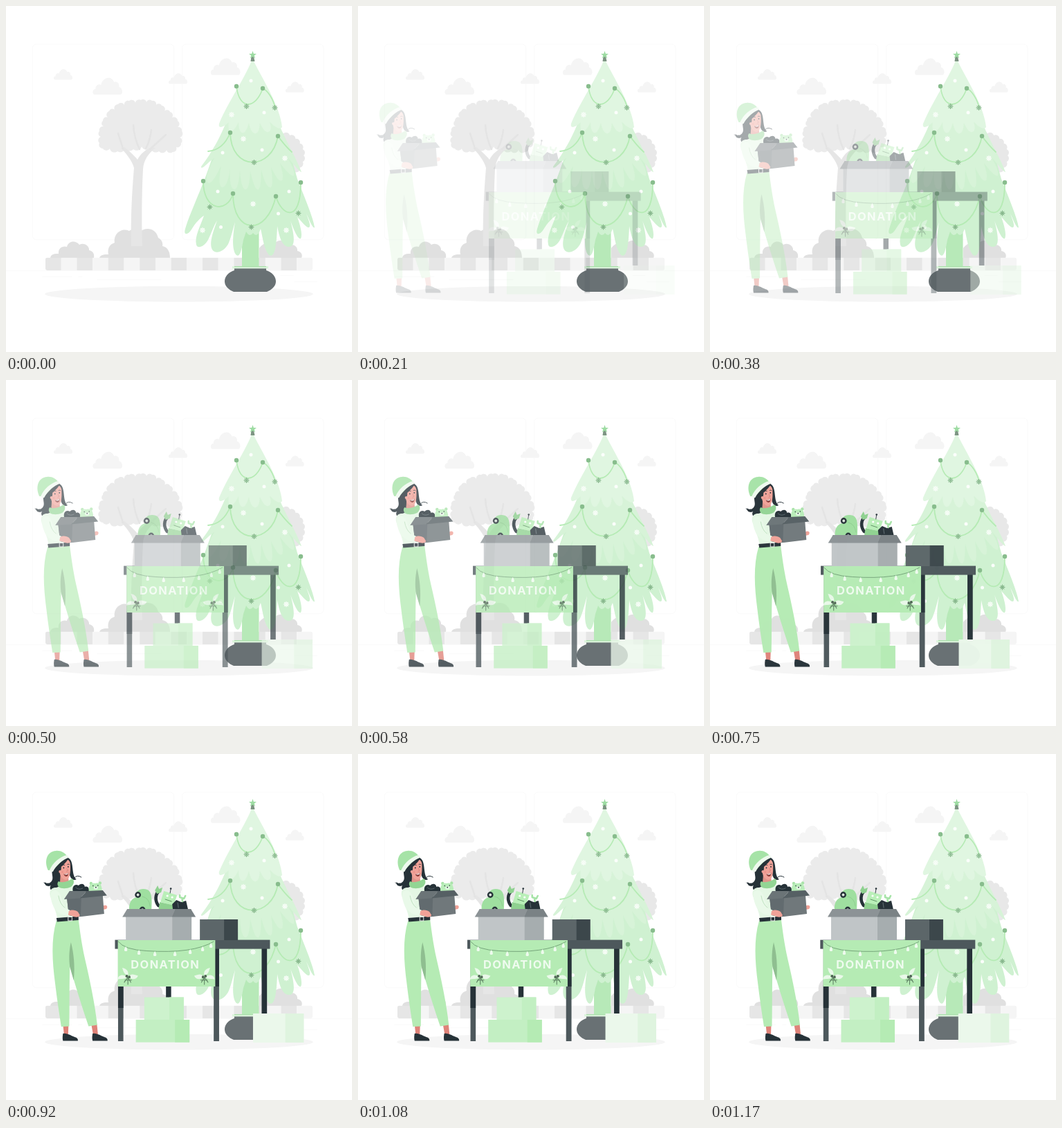
An HTML page for the animation above (1210 ms loop, 500 by 500 pixels).

```html
<!DOCTYPE html>
<html lang="en">
<head>
<meta charset="utf-8">
<title>Donation table</title>
<style>
html, body { margin: 0; width: 100%; height: 100%; overflow: hidden; background: #fff; }
svg { display: block; width: 100%; height: 100%; }
</style>
</head>
<body>
<svg viewBox="0 0 500 500">
  <g id="back"></g>
  <g id="pine"></g>
  <g id="table" opacity="0"></g>
  <g id="girl" opacity="0"></g>
</svg>
<script>
const $ = id => document.getElementById(id);
const path = (d, fill) => `<path d="${d}" fill="${fill}"/>`;
const line = (d, color, w = 1) =>
  `<path d="${d}" fill="none" stroke="${color}" stroke-width="${w}" stroke-linecap="round" stroke-linejoin="round"/>`;
const rect = (x, y, w, h, fill) => `<rect x="${x}" y="${y}" width="${w}" height="${h}" fill="${fill}"/>`;
const dot = (x, y, r, fill) => `<circle cx="${x}" cy="${y}" r="${r}" fill="${fill}"/>`;
const ring = (x, y, r, color, w) => `<circle cx="${x}" cy="${y}" r="${r}" fill="none" stroke="${color}" stroke-width="${w}"/>`;

const GREEN = '#b5ebb4', INK = '#263238', STEEL = '#4d585c', SKIN = '#f0a298', PALE = '#e4f7e4';

// Closed outline made of small round bumps
function scallop(pts, fill, bulge = 0.58) {
  let d = `M${pts[0]}`;
  pts.forEach((p, i) => {
    const q = pts[(i + 1) % pts.length];
    const r = Math.hypot(q[0] - p[0], q[1] - p[1]) * bulge;
    d += `A${r} ${r} 0 0 1 ${q}`;
  });
  return path(d + 'Z', fill);
}

function oval(cx, cy, rx, ry, n) {
  return Array.from({ length: n }, (_, i) => {
    const a = i / n * 2 * Math.PI;
    return [cx + rx * Math.cos(a), cy + ry * Math.sin(a)];
  });
}

function flake(x, y, r, color, w) {
  let d = '';
  for (let i = 0; i < 4; i++) {
    const a = i * Math.PI / 4, dx = r * Math.cos(a), dy = r * Math.sin(a);
    d += `M${x - dx} ${y - dy}L${x + dx} ${y + dy}`;
  }
  return line(d, color, w) + ring(x, y, r * 0.72, color, w * 0.8);
}

function cloud(x, y, s) {
  return `<g transform="translate(${x} ${y}) scale(${s})">` + path(
    'M3 25C-1 25-1 17 4 17C4 11 9 9 12 11C14 1 26-4 31 7C36 5 39 10 38 14C44 15 44 25 40 25Z', '#f5f5f5') + '</g>';
}

function drawBack() {
  let s = '';
  for (const x of [38.3, 254.6])
    s += `<rect x="${x}" y="55.1" width="204.3" height="282.6" rx="5.6" fill="none" stroke="#ebebeb" stroke-width=".25"/>`;
  s += rect(0, 382.4, 500, 0.25, '#ebebeb');
  for (const [x, y, w] of [[416.8, 398.5, 33], [396.6, 389.2, 19], [52.5, 390.9, 43], [104.6, 390.9, 6], [131.5, 395.1, 93]])
    s += rect(x, y, w, 0.25, '#ebebeb');
  s += cloud(69, 90.8, 0.63) + cloud(125.3, 103, 1) + cloud(235, 96.8, 0.63) +
       cloud(295.8, 74.8, 1) + cloud(403.8, 109, 0.63);
  s += scallop(oval(396, 216, 34, 32, 22), '#e8e8e8');
  s += scallop([[140, 206], [135, 198], [137, 189], [135, 181], [141, 174], [140, 166], [147, 161], [149, 152],
    [157, 150], [162, 142], [171, 143], [178, 137], [187, 140], [195, 136], [203, 139], [211, 137], [217, 143],
    [225, 144], [229, 152], [237, 153], [240, 161], [248, 166], [248, 175], [254, 181], [251, 190], [253, 198],
    [246, 204], [241, 211], [232, 208], [221, 210], [209, 205], [196, 203], [184, 207], [172, 205], [161, 210], [150, 206]], '#ebebeb');
  // bushes
  s += path('M64 364C65 358 71 358 76 358C75 350 82 346 88 348C90 339 101 338 106 345C113 341 121 347 120 353C126 354 128 359 127 364Z', '#e0e0e0');
  s += path('M135 364C137 359 142 359 148 359C146 349 151 344 157 342C155 329 167 320 178 325C184 321 191 322 195 325C204 319 217 322 220 335C226 338 227 344 226 347C234 348 237 356 237 364Z', '#e0e0e0');
  s += path('M366 364V350C372 342 381 339 389 342C396 336 407 339 409 346C415 343 422 348 421 354C427 355 429 360 427 364Z', '#e0e0e0');
  // trunk
  s += path('M181 347C180 305 182 270 185 234C182 222 172 212 166 205L171 204C180 211 186 217 190 222C194 214 202 207 210 204L216 205C206 213 199 222 198 236C196 275 196 315 197 347Z', '#e6e6e6');
  s += line('M169 206L162 184M184 172Q185 190 193 207M208 207L231 186M202 206Q208 195 210 179', '#e4e4e4', 2.5);
  // planter bricks
  s += '<clipPath id="wall"><rect x="57" y="363.6" width="386" height="18.4" rx="3"/></clipPath><g clip-path="url(#wall)">';
  for (let i = 0; i < 17; i++)
    s += rect(57 + i * 22.7, 363.6, 22.8, 18.4, (i % 2 === 0) === (i < 13) ? '#e6e6e6' : '#f5f5f5');
  s += '</g><ellipse cx="250" cy="416.2" rx="193.9" ry="11.3" fill="#f5f5f5"/>';
  return s;
}

function drawPine() {
  let s = rect(341, 312, 24.5, 65, '#b7e9b8');
  s += path('M302 205C292 245 267 295 259 322C256 332 263 331 268 323C274 313 281 306 286 303C281 318 272 333 275 345C277 352 287 347 292 338C297 328 300 318 305 310C300 325 293 342 298 352C303 360 317 354 322 342C326 332 328 322 331 312C328 330 326 350 332 359C338 366 341 350 343 338L347 326Q352 335 357 328Q363 336 368 322C371 335 373 352 380 360C389 365 391 345 392 318C395 334 399 347 408 348C419 349 417 333 411 310C415 322 422 338 426 336C429 331 425 316 421 305C427 311 434 321 438 320C441 317 437 309 434 300C438 308 443 322 446 320C444 306 432 278 421 250L407 200Z', '#cff1d1');
  s += path('M324 150C316 180 297 213 282 232C282 239 293 224 301 220C293 234 286 252 293 256C300 255 307 238 311 231C308 246 307 262 313 262C320 260 322 246 324 236C323 250 324 266 331 265C336 262 337 248 338 238C339 251 341 266 347 265C352 262 352 249 353 239C356 251 360 267 365 265C369 261 368 247 369 237C372 249 377 264 383 262C387 257 384 243 383 233C388 243 394 255 399 252C402 246 398 235 396 227C402 235 412 247 416 245C418 238 411 227 407 219C413 225 424 240 427 240C420 220 401 190 388 155Z', '#d7f3d8');
  s += path('M356 76C348 100 320 140 308 170C306 179 316 174 322 168C320 178 323 184 328 180C332 176 334 172 336 168C336 180 340 186 345 182C349 177 350 172 351 169C353 180 358 187 363 183C367 178 366 173 367 169C371 178 376 185 381 181C384 177 382 171 381 167C387 174 396 180 399 175C396 145 372 108 356 76Z', '#e0f6e1');
  // garlands
  s += line('M333 116C337 151 361 149 371 119C378 122 386 134 389 147', GREEN, 1.6);
  s += line('M292 210Q314 208 324 183C325 239 384 239 393 188Q403 202 413 211', GREEN, 1.8);
  s += line('M285 253C285 297 320 300 328 271C328 331 377 333 390 275C398 303 426 316 426 255', GREEN, 1.8);
  for (const [x, y] of [[333, 116], [371, 119], [324, 183], [393, 188], [285, 253], [328, 271], [390, 275], [426, 255]])
    s += dot(x, y, 3.2, '#88bd8d');
  for (const [x, y] of [[347.5, 145], [388.5, 147], [358.5, 226], [294.5, 290.5], [354.5, 319.5], [422.5, 299.5]])
    s += flake(x, y, 3.6, '#83b488', 0.9);
  for (const [x, y] of [[354, 108], [373, 154], [313, 212], [370, 208], [306, 268], [409, 268], [310.5, 319.5], [393.5, 300]])
    s += dot(x, y, 2.5, '#fbfefb');
  for (const [x, y] of [[326, 157], [343, 192], [403, 220], [357, 286], [284, 324], [405, 324]])
    s += flake(x, y, 3.8, '#f7fdf7', 1.1);
  // star and pot
  s += path('M354.5 73H358L359.5 80H353.5Z', '#7d9583');
  s += path('M356.5 65L357.9 69L362 69L358.8 71.6L360 75.5L356.5 73.2L353 75.5L354.2 71.6L351 69L355.1 69Z', '#9edca3');
  s += path('M330 379H376V382C385 385 390 391 390 398C390 405 384 410 377 413H329C322 410 316 405 316 398C316 391 321 385 330 382Z', '#697174');
  s += rect(327, 376, 52, 3.4, '#dcf4dc') + rect(330, 376, 46, 1.2, '#a9dfaa');
  return s;
}

function holly(x, side) {
  const leaves = 'M0-1C-7-4-6-9-8-12C-2-11 2-7 0-1ZM-1 1C-6 5-10 2-14 4C-14-2-6-4-1 1ZM1 0C5-5 9-2 14-1C11 5 5 5 1 0Z';
  return `<g transform="translate(${x} 321.5) scale(${side * 1.05} 1.05)">` + path(leaves, '#e9f8e9') +
    line('M0 1L-5 8M0 1L4 8M0 1L0 11M-3 0L3 2M-4 5L5 5', '#5d7f62', 1) +
    dot(-1.5, -0.5, 1.8, '#4d6252') + dot(2, 0.5, 1.6, '#4d6252') + '</g>';
}

function drawToys() {
  return path('M180 226C179 215 183 209 190 207C188 197 197 193 206 196C213 199 213 210 212 226Z', '#9fdfa0') +
    line('M199 206Q209 208 210 220', '#8fcf90', 1) +
    dot(192.5, 203.5, 4.4, INK) + dot(192.5, 203.5, 1.9, '#dfe8df') +
    dot(199, 225, 4.4, INK) + dot(199, 225, 1.8, '#dfe8df') +
    line('M223 198C217 203 217 212 222 219L227 220', INK, 4.6) +
    path('M217 197L221 190L223 195L228 193L226 200L220 202Z', '#8fd190') +
    path('M230 198L249 204L244 219L225 214Z', '#b9efb8') +
    path('M224 214L246 219L245 226H222Z', '#8fd190') +
    line('M239 201L240 195', INK, 0.9) + dot(240, 194.5, 1.3, INK) +
    dot(235, 205, 1.6, '#fff') + dot(242, 207, 1.6, '#fff') + line('M232 210L241 213', '#5e9463', 1) +
    path('M242 217L248 211L255 214L262 212L265 225H243Z', INK) + line('M250 215L251 222', '#59666b', 1.2) +
    line('M257 213L256 208M253 204L253 207L259 209L261 205', '#a6e3a7', 2.6);
}

function drawTable() {
  let s = rect(371.3, 281, 7.7, 94, INK) + rect(233, 334, 7.5, 20, INK);
  s += rect(302, 281, 7.8, 134, STEEL) + rect(304, 281, 5.8, 55, INK);
  s += rect(163.8, 281, 7.6, 134, STEEL) + rect(163.8, 334, 7.6, 33, INK);
  s += rect(159.3, 268.6, 224, 13, STEEL);
  // boxes on the floor
  s += rect(201.7, 351.5, 57, 32.7, '#cdf2cd') + rect(238, 351.5, 20.7, 32.7, '#c2efc2');
  s += rect(189.5, 384, 77.5, 32.6, '#c3efc3') + rect(246, 384, 21, 32.6, GREEN);
  s += rect(358.8, 375, 73.4, 42, '#ebf8eb') + rect(405.5, 375, 26.7, 42, '#dff4df');
  // boxes on the table
  s += rect(282, 239, 55, 30, '#5c6669') + rect(317, 239, 19.7, 30, '#3c474b');
  s += path('M177 224H269L270 236H175Z', '#6b7477') + drawToys();
  s += rect(175, 235, 67.5, 34, '#c0c5c7') + rect(242, 235, 28, 34, '#a6adaf');
  s += path('M177 224H247L242 235.5H170Z', '#8c9396') + path('M247 224H269L276 235.5H242Z', '#7a8285');
  // cloth
  s += rect(163.5, 269, 140.7, 67, GREEN);
  s += line('M164 271Q173 283 205 284.5Q272 289 302 271', '#6f9d74', 0.9);
  for (const [x, y] of [[175, 279], [194, 284], [217, 286], [246, 286], [268, 283], [286, 279], [298, 274]])
    s += path(`M${x} ${y - 1}C${x + 4} ${y + 5} ${x + 1.5} ${y + 6.5} ${x} ${y + 6}C${x - 1.5} ${y + 6.5} ${x - 4} ${y + 5} ${x} ${y - 1}Z`, '#eefaee');
  s += holly(178, 1) + holly(288.5, -1);
  s += '<text x="182.2" y="309.6" font-family="Inter, sans-serif" font-weight="700" font-size="16.5" letter-spacing="1.35" fill="#effbef">DONATION</text>';
  return s;
}

function drawGirl() {
  // hair behind the head
  let s = path('M66 163C62 174 69 179 63 185C60 188 56 187 54 185C54 191 59 192 63 190C60 194 63 199 70 199C77 199 79 192 79 184L82 160L88 150C94 153 94 162 95 170C96 177 98 180 100 181C95 184 90 179 90 172L86 152Z', INK);
  s += line('M59 187Q55 189 53 186M97 179Q101 174 107 178', INK, 1);
  // ankles and shoes
  s += path('M80.5 391L88.5 391L88 405L82 405ZM121.5 391L129.5 390L131 405L124 405Z', '#df8379');
  const shoe = 'M80.5 404C84 403 87 405 91 406C95 409 102 409 102 413V414.5H80.5C79.5 411 80 407 80.5 404Z';
  s += path(shoe, INK) + `<g transform="translate(42.8)">${path(shoe, INK)}</g>`;
  // trousers
  s += path('M71 241C63 268 65 300 69 330C72 355 75 375 78 394L89.5 393.5C90 368 89.5 338 90.5 306L96 326C104 353 111 374 117.5 393.5L130 391.5C126.5 360 119 325 112 295C107 272 105 255 103 240Z', GREEN);
  s += path('M92 272C89 285 89 298 90.5 308L96 327C98 305 96 288 92 272Z', '#8fbe90');
  // jumper and belt
  s += path('M71 193C61 193 60 201 63 208C66 218 71 228 72 237L103 235L104 198C100 190 90 188 82 189Z', PALE);
  s += path('M71 237L103 234.5V240L72 242.5Z', INK) + `<rect x="88" y="235.5" width="5.5" height="5.5" fill="none" stroke="#e8e8e8"/>`;
  // face
  s += path('M77 172L76 187C80 193 88 192 89 186L88 176Z', '#e0958b');
  s += path('M76 160C74 172 77 180 84 182C90 182 92 173 91 158C90 154 88 152 85 153C80 154 77 156 76 160Z', SKIN);
  s += path('M68 163C73 155 80 151 88 149L88 152C84 158 80 161 78 163C78 168 77 171 75 172C76 176 77 180 75 185L66 180Z', INK);
  s += dot(76.5, 170, 2.1, SKIN);
  s += dot(81.5, 164.5, 0.9, INK) + dot(88, 163, 0.9, INK);
  s += line('M79.5 161Q81 159.5 83 160.5M86.8 159.5Q88 158.5 89.5 159.5', INK, 0.8);
  s += line('M86 165L87.5 169L85.5 169.5', '#d07d74', 0.7);
  s += path('M81.5 173Q85 174 88.5 171.5Q88 177 85 177Q82 176.5 81.5 173Z', '#8a3a36') + path('M82 173.2Q85 174 88 172L87.7 173.4Q85 175 82.2 174Z', '#fff');
  s += dot(79.8, 170.5, 1.5, '#eb938a');
  // scarf
  s += path('M74 184C80 187 88 184 94 180C98 184 96 189 92 192C86 195 78 195 74 192C72 189 72 186 74 184Z', '#93d594');
  // hat
  s += path('M59 168C53 155 57 141 70 140C77 139 83 143 86 147L66 168Z', '#a6e3a7');
  s += path('M61 168C66 157 75 149 86 146Q88.5 147 89 149.5C80 153 71 160 66 170Q62 171 61 168Z', '#eef9ee');
  // gifts
  s += path('M95 199C93 191 98 187 103 190C107 186 112 188 112 192C117 190 119 195 118 200Z', INK);
  s += line('M99 193Q103 197 109 194', '#59666b', 1);
  s += dot(121, 187, 2.2, '#a9e3a9') + dot(134, 186.5, 2.2, '#a9e3a9');
  s += path('M118 200C117 190 120 186 127 187C134 185 137 189 137 199Z', '#b9edb9');
  s += dot(124, 190.5, 0.8, INK) + dot(131, 190, 0.8, INK) + `<ellipse cx="128" cy="193.5" rx="3" ry="2.2" fill="#e8f8e8"/>` + dot(128, 192.7, 0.9, INK);
  // carton
  s += path('M139 219C144 217 146 221 143 224L138 225Z', SKIN);
  s += path('M86 207L107 206L138 204L140 231L107 235L89 233Z', '#70787b') + path('M86 207L107 206L106 235L89 233Z', '#626b6f');
  s += path('M90 198L115 198L105 208.5L82 210Z', '#6b7477') + path('M115 198L138 197L144 204.5L105 208.5Z', '#566064');
  // near arm
  s += path('M64 199C70 193 77 200 79 210L83 222L93 227L89 234C80 233 71 229 67 221C64 214 61 205 64 199Z', '#e9f9e9');
  s += line('M74 205Q76 217 83 222', '#bfe2c0', 1);
  s += path('M89 227C94 224 99 226 102 228L105 233C103 237 97 236 94 234L88 232.5Z', SKIN);
  return s;
}

$('back').innerHTML = drawBack();
$('pine').innerHTML = drawPine();
$('table').innerHTML = drawTable();
$('girl').innerHTML = drawGirl();

const LOOP = 1210, STEPS = 29, STEP = 1000 / 24, SLIDE = 30;
const curve = (a, b, u) => 3 * (1 - u) * (1 - u) * u * a + 3 * (1 - u) * u * u * b + u * u * u;

// cubic-bezier(.36, -.01, .5, 1.38)
function ease(x) {
  let lo = 0, hi = 1;
  for (let i = 0; i < 30; i++) {
    const mid = (lo + hi) / 2;
    if (curve(0.36, 0.5, mid) < x) lo = mid; else hi = mid;
  }
  return curve(-0.01, 1.38, lo);
}

function pose(t) {
  const k = Math.min(STEPS - 1, Math.floor((Math.floor(t / 10) * 10 + 4.9) / STEP));
  const p = k < 3 ? 0 : ease((k + 1) / STEPS);
  const shift = SLIDE * (1 - p);
  for (const [id, dir] of [['girl', -1], ['table', 1]]) {
    $(id).setAttribute('transform', `translate(${(dir * shift).toFixed(3)} 0)`);
    $(id).setAttribute('opacity', Math.max(0, Math.min(1, p)).toFixed(4));
  }
}

const start = performance.now();
function tick() {
  pose((performance.now() - start) % LOOP);
  requestAnimationFrame(tick);
}
tick();
</script>
</body>
</html>
```
